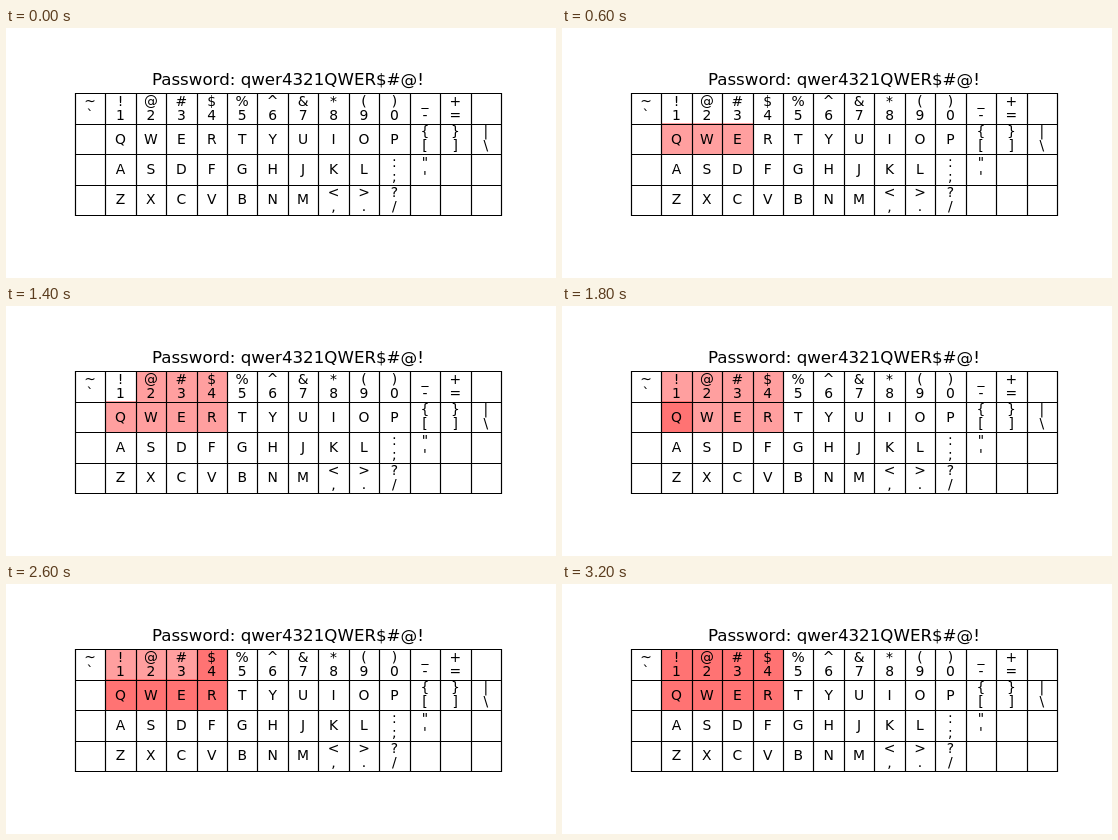
These frames come from a looping animation (550 px wide and 250 px high, 3.4 s). An HTML page:

```html
<!DOCTYPE html>
<html lang="en">
<head>
<meta charset="utf-8">
<title>Password keys</title>
<style>
  html, body { margin: 0; width: 100%; height: 100%; overflow: hidden; background: #fff; }
  svg { display: block; }
  text { font: 13.89px "DejaVu Sans", sans-serif; text-anchor: middle; white-space: pre; }
  .title { font-size: 16.67px; }
  .grid { stroke: #000; stroke-width: 1.2; stroke-linecap: square; fill: none; }
</style>
</head>
<body>
<svg width="550" height="250" viewBox="0 0 550 250"></svg>
<script>
const svg = document.querySelector('svg');
const LEFT = 68.75, TOP = 65.36, CELL = 426.25 / 14;
const COLS = 14, ROWS = 4, STEP = 200, LOOP = 3400;
const SHADES = ['#fff', '#ff9f9f', '#ff7373'];

// Upper and lower symbol of each key; a blank lower one centres the upper.
const KEYS = [
  ['~!@#$%^&*()_+', '`1234567890-='],
  [' QWERTYUIOP{}|', '           []\\'],
  [' ASDFGHJKL:"', "          ;'"],
  [' ZXCVBNM<>?', '        ,./']
];

function add(tag, attrs, content = '') {
  const el = document.createElementNS('http://www.w3.org/2000/svg', tag);
  for (const name in attrs) el.setAttribute(name, attrs[name]);
  el.textContent = content;
  svg.append(el);
  return el;
}

const edgeX = c => Math.round(LEFT + c * CELL) + 0.5;
const edgeY = r => Math.round(TOP + r * CELL) + 0.5;

function addKey(col, row) {
  const y = row ? 95 : 65.5, bottom = row ? 126.5 : 95;
  return add('rect', {
    x: edgeX(col), y, width: edgeX(col + 1) - edgeX(col), height: bottom - y
  });
}

// Typing order: q w e r, then 4 3 2 1.
const typed = [1, 2, 3, 4].map(c => addKey(c, 1))
  .concat([4, 3, 2, 1].map(c => addKey(c, 0)));

let grid = '';
for (let c = 0; c <= COLS; c++) grid += `M${edgeX(c)} ${edgeY(0)}V${edgeY(ROWS)}`;
for (let r = 0; r <= ROWS; r++) grid += `M${edgeX(0)} ${edgeY(r)}H${edgeX(COLS)}`;
add('path', { class: 'grid', d: grid });

add('text', { class: 'title', x: 281.9, y: 57 }, 'Password: qwer4321QWER$#@!');

KEYS.forEach(([upper, lower], r) => {
  const mid = TOP + (r + 0.5) * CELL;
  [...upper].forEach((symbol, c) => {
    const x = LEFT + (c + 0.5) * CELL;
    const label = (s, dy) => add('text', { x, y: Math.round(mid + dy) }, s);
    const second = (lower[c] || '').trim();
    if (second) {
      label(symbol, -2.8);
      label(second, 11.2);
    } else if (symbol !== ' ') {
      label(symbol, 4.5);
    }
  });
});

function draw(now) {
  const presses = Math.floor(now % LOOP / STEP);
  typed.forEach((key, i) => {
    const count = Math.floor((presses + typed.length - 1 - i) / typed.length);
    key.setAttribute('fill', SHADES[count]);
  });
}

const start = performance.now();
function tick() {
  draw(performance.now() - start);
  requestAnimationFrame(tick);
}
tick();
</script>
</body>
</html>
```
